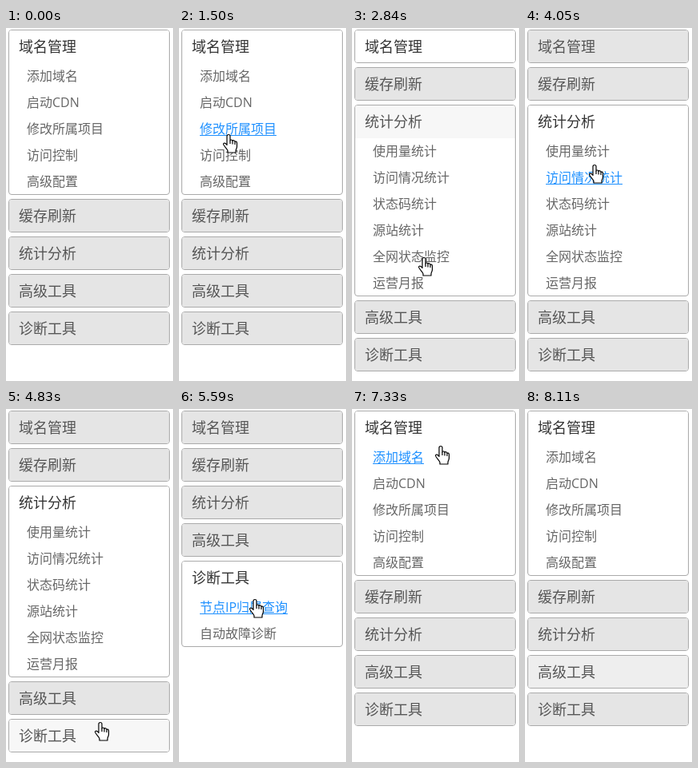
An HTML page that plays this animation: 209x442 px, repeating every 8990 ms.

```html
<!DOCTYPE html>
<html lang="zh-CN">
<head>
<meta charset="utf-8">
<style>
html, body { margin: 0; width: 100%; height: 100%; overflow: hidden; background: #fff; }
body { position: relative; font-family: "Open Sans", "Noto Sans CJK SC", "Noto Sans CJK", sans-serif; white-space: nowrap; }
.panel { position: absolute; left: 3px; width: 202px; box-sizing: border-box; border: 1px solid #aaa; border-radius: 4px; overflow: hidden; background: #fff; }
.head { height: 40px; line-height: 40px; padding: 0 0 1px 12px; font-size: 18px; }
.item { height: 33px; line-height: 33px; padding-left: 22px; font-size: 16px; color: #666; }
.item.on { color: #1e90ff; text-decoration: underline 1px; text-underline-offset: 2px; }
#hand { position: absolute; left: 0; top: 0; overflow: visible; }
</style>
</head>
<body>
<svg id="hand" width="1" height="1" fill="#fff" stroke="#000" stroke-width="1.2" stroke-linejoin="round">
  <path d="M-2 2.5C-2-.2 2-.2 2 2.5V8C2 6.6 4.7 6.6 5 8.5C5.5 7.2 7.8 7.4 8 9.5C8.7 8.6 10.5 9 10.5 11V15.5C10.5 18 9 19 9 21V23H-1V21C-1 19-6 15-6.5 12.5C-6.5 10.5-4 10.5-2 13.5Z"/>
  <path d="M2 8V12M5 8.5V12.5M8 9.5V13"/>
</svg>
<script>
const MENU = [
  ['域名管理', '添加域名', '启动CDN', '修改所属项目', '访问控制', '高级配置'],
  ['缓存刷新'],
  ['统计分析', '使用量统计', '访问情况统计', '状态码统计', '源站统计', '全网状态监控', '运营月报'],
  ['高级工具'],
  ['诊断工具', '节点IP归属查询', '自动故障诊断']
];
const LOOP = 8990, START = 180, TICK = 110, LAST = 72;
const HEAD = 42, ROW = 33, GAP = 5;
const CLOSED = 229, HOVER = 247, OPEN = 255;

// Stops of the pointer tip: tick, x, y
const STOPS = [
  [0, 168, 417], [1, 112, 190], [8, 60, 62], [12, 62, 133], [18, 76, 200],
  [22, 90, 287], [30, 90, 287], [36, 87, 162], [39, 118, 392], [46, 118, 392],
  [49, 95, 238], [52, 98, 250], [53, 100, 280], [55, 100, 280],
  [58, 110, 34], [64, 110, 34], [70, 130, 195], [LAST, 188, 442]
];

const hand = document.getElementById('hand');
const add = (parent, cls, text = '') => {
  const el = document.createElement('div');
  el.className = cls;
  el.textContent = text;
  return parent.appendChild(el);
};
const panels = MENU.map(([title, ...names]) => {
  const box = add(document.body, 'panel');
  return { box, head: add(box, 'head', title), items: names.map(n => add(box, 'item', n)) };
});
document.body.append(hand);

const openAt = k => k < 24 ? 0 : k < 44 ? 2 : k < 62 ? 4 : 0;
const heightOf = (i, open) => HEAD + (i === open ? panels[i].items.length * ROW : 0);
const topOf = (i, open) => {
  let y = 2;
  for (let j = 0; j < i; j++) y += heightOf(j, open) + GAP;
  return y;
};
const toward = (v, goal, step) => v + Math.max(-step, Math.min(step, goal - v));
const ease = f => f * f * (3 - 2 * f);
const gray = v => `rgb(${v},${v},${v})`;

function pointer(k) {
  if (k < 0 || k >= LAST) return null;
  const n = STOPS.findIndex(s => s[0] > k);
  const [k0, x0, y0] = STOPS[n - 1], [k1, x1, y1] = STOPS[n];
  const f = ease((k - k0) / (k1 - k0));
  return { x: x0 + (x1 - x0) * f, y: y0 + (y1 - y0) * f };
}

// Header shades by tick, each fading one step towards its goal
const shades = [panels.map((_, i) => i ? [CLOSED, 85] : [OPEN, 51])];
for (let k = 1; k <= LAST; k++) {
  const open = openAt(k - 1), p = pointer(k - 1);
  shades.push(shades[k - 1].map(([bg, ink], i) => {
    const dy = p ? p.y - topOf(i, open) : -1;
    const goal = i === open ? OPEN : dy >= 0 && dy < HEAD ? HOVER : CLOSED;
    return [toward(bg, goal, 9), toward(ink, i === open ? 51 : 85, 12)];
  }));
}

function draw(t) {
  const k = Math.floor((t - START) / TICK);
  const open = openAt(k), p = pointer(k);
  const settled = openAt(k - 1) === open;
  const shade = shades[Math.max(0, Math.min(k, LAST))];
  panels.forEach(({ box, head, items }, i) => {
    const top = topOf(i, open), [bg, ink] = shade[i];
    box.style.top = top + 'px';
    box.style.height = heightOf(i, open) + 'px';
    head.style.background = gray(bg);
    head.style.color = gray(ink);
    const row = p && settled && i === open ? Math.floor((p.y - top - HEAD + 1) / ROW) : -1;
    items.forEach((el, j) => el.classList.toggle('on', j === row));
  });
  hand.style.display = p ? '' : 'none';
  if (p) hand.style.transform = `translate(${Math.round(p.x)}px,${Math.round(p.y)}px)`;
}

const begin = performance.now();
function loop() {
  draw((performance.now() - begin) % LOOP);
  requestAnimationFrame(loop);
}
loop();
</script>
</body>
</html>
```
